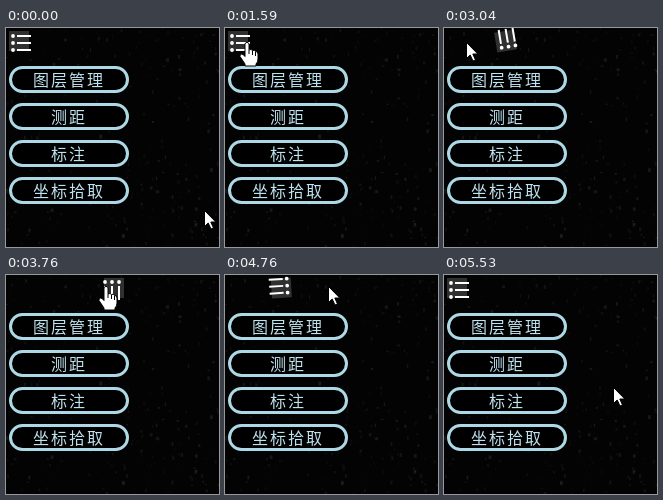
An HTML page with a canvas for the animation above (5.6 s loop, 213 by 219 pixels).

```html
<!DOCTYPE html>
<html lang="zh">
<head>
<meta charset="utf-8">
<style>
  html, body { margin: 0; width: 100%; height: 100%; overflow: hidden; background: #030303; }
  canvas { display: block; }
</style>
</head>
<body>
<canvas id="stage" width="213" height="219"></canvas>
<script>
const LOOP = 5600;
const LABELS = ['图层管理', '测距', '标注', '坐标拾取'];
const HOME = 13, TRAVEL = 95, TURN = 450;

// Pointer path: time, x, y
const POINTER = [
  [0, 198, 182], [70, 197, 172], [300, 192, 144], [470, 190, 147],
  [800, 96, 38], [940, 117, 44], [1040, 117, 44], [1120, 100, 41],
  [1590, 22, 14], [3300, 22, 14], [3540, 56, 140], [3760, 100, 11],
  [3900, 103, 11], [4950, 103, 11], [5530, 169, 112], [LOOP, 169, 112]
];
const CLICKS = [[2080, 2160], [4140, 4210]];

const ARROW = new Path2D('M.5 .5V16.5L4.2 13L7 19L9.5 18L6.8 12H11.8Z');
const HAND = new Path2D('M-2 1.5Q0 -1 2 1.5V8Q4 6.5 5.5 8.5Q7.5 7.5 8.5 9.5' +
  'Q11 9 11 12V17Q11 20 9 22V24H-2V22L-7 14.5Q-7 11 -4 12.5L-2 14.5Z');

const stage = document.getElementById('stage');
const ctx = stage.getContext('2d');
const backdrop = makeBackdrop();

function makeBackdrop() {
  const layer = document.createElement('canvas');
  layer.width = stage.width;
  layer.height = stage.height;
  const c = layer.getContext('2d');
  let seed = 7;
  const random = () => (seed = seed * 16807 % 2147483647) / 2147483647;

  c.fillStyle = '#030303';
  c.fillRect(0, 0, 213, 219);
  for (let i = 0; i < 650; i++) {
    c.fillStyle = `rgba(255,255,255,${random() ** 3 * 0.09})`;
    c.fillRect(random() * 213, random() * 219, 1 + random() * 2, 1 + random() * 3);
  }

  c.strokeStyle = '#add8e6';
  c.lineWidth = 3;
  c.font = '16px "Noto Sans CJK SC", "Noto Sans CJK", sans-serif';
  c.letterSpacing = '2px';
  c.textAlign = 'center';
  c.textBaseline = 'alphabetic';
  LABELS.forEach((label, i) => {
    const y = 38 + 37 * i;
    c.beginPath();
    c.roundRect(4.5, y + 1.5, 117, 24, 12);
    c.fillStyle = '#000';
    c.fill();
    c.stroke();
    c.fillStyle = '#bfe2ee';
    c.fillText(label, 63, y + 20);
  });
  return layer;
}

// cubic-bezier(.25, .1, .25, 1)
function ease(x) {
  if (x <= 0) return 0;
  if (x >= 1) return 1;
  const curve = (s, a, b) => 3 * (1 - s) ** 2 * s * a + 3 * (1 - s) * s * s * b + s ** 3;
  let lo = 0, hi = 1;
  for (let i = 0; i < 20; i++) {
    const mid = (lo + hi) / 2;
    if (curve(mid, 0.25, 0.25) < x) lo = mid; else hi = mid;
  }
  return curve(lo, 0.1, 1);
}

// Out and back, one second each way
const swing = t => ease((t - 2705) / 1000) - ease((t - 4408) / 1000);

function pointerAt(t) {
  const i = POINTER.findIndex(key => key[0] > t);
  const [t0, x0, y0] = POINTER[i - 1];
  const [t1, x1, y1] = POINTER[i];
  const k = (t - t0) / (t1 - t0);
  return [Math.round(x0 + (x1 - x0) * k), Math.round(y0 + (y1 - y0) * k)];
}

function drawIcon(x, angle) {
  ctx.save();
  ctx.translate(x, HOME);
  ctx.rotate(angle * Math.PI / 180);
  ctx.fillStyle = '#303030';
  ctx.fillRect(-10, -10, 20, 20);
  ctx.fillStyle = '#fff';
  for (const y of [-5, 2, 9]) {
    ctx.beginPath();
    ctx.arc(-6, y, 1.9, 0, 7);
    ctx.fill();
    ctx.fillRect(-2, y - 1, 14, 2);
  }
  ctx.restore();
}

function drawPointer(x, y, shape) {
  ctx.save();
  ctx.translate(x, y);
  ctx.fillStyle = '#fff';
  ctx.strokeStyle = '#000';
  ctx.lineWidth = 1;
  ctx.fill(shape);
  ctx.stroke(shape);
  if (shape === HAND) {
    ctx.beginPath();
    for (const [fx, top] of [[2, 8], [5.5, 9], [8.5, 10]]) {
      ctx.moveTo(fx, top);
      ctx.lineTo(fx, top + 4);
    }
    ctx.stroke();
  }
  ctx.restore();
}

function draw(now) {
  const t = now % LOOP;
  const iconX = HOME + TRAVEL * swing(t - 36);
  const [x, y] = pointerAt(t);
  ctx.drawImage(backdrop, 0, 0);
  drawIcon(iconX, TURN * swing(t));
  if (CLICKS.some(([from, to]) => t >= from && t < to)) {
    ctx.fillStyle = 'rgba(255,255,0,.47)';
    ctx.beginPath();
    ctx.arc(x, y, 12, 0, 7);
    ctx.fill();
  }
  const hovering = Math.hypot(x - iconX, y - HOME) < 11;
  drawPointer(x, y, hovering ? HAND : ARROW);
}

let start;
function tick(now) {
  start ??= now;
  draw(now - start);
  requestAnimationFrame(tick);
}
draw(0);
requestAnimationFrame(tick);
</script>
</body>
</html>
```
